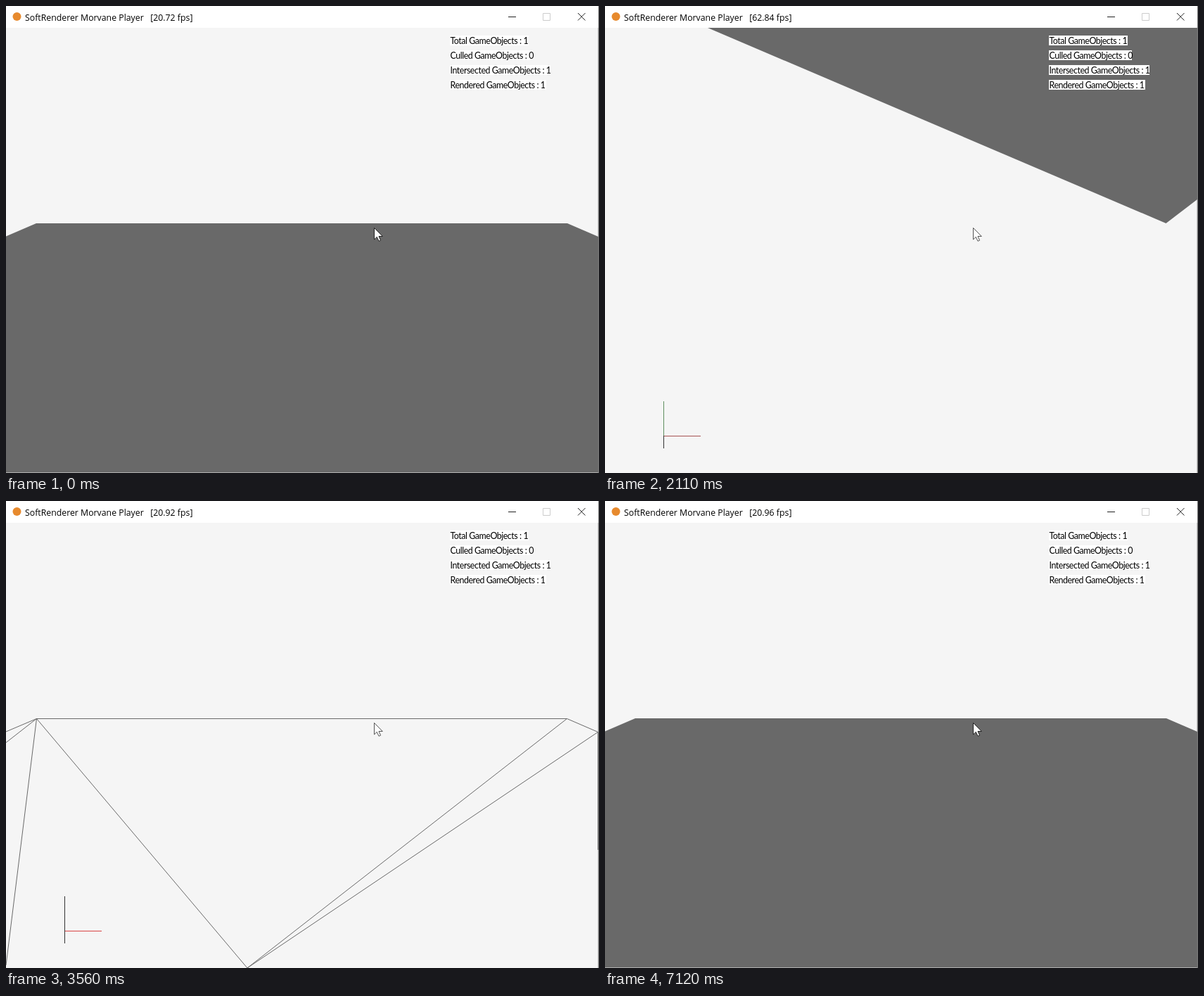
An HTML page that plays this animation: 843 by 664 pixels, repeating every 7.65 s.

```html
<!DOCTYPE html>
<html lang="en">
<head>
<meta charset="utf-8">
<title>SoftRenderer</title>
<style>
  html, body { margin: 0; width: 100%; height: 100%; overflow: hidden; background: #fff; }
  svg { display: block; }
  .title { font: 12.3px "Open Sans", "Noto Sans", sans-serif; white-space: pre; }
  .stats { font: 12.4px Lato, sans-serif; letter-spacing: -.44px; }
  .wire { fill: none; stroke: #696969; }
  .solid { fill: #696969; }
</style>
</head>
<body>
<svg width="843" height="664" viewBox="0 0 843 664">
  <rect width="843" height="664" fill="#fff"/>
  <circle cx="15.5" cy="15" r="6" fill="#e78a2e"/>
  <text class="title" x="27" y="21">SoftRenderer Morvane Player</text>
  <text class="title" id="fps" x="205.2" y="21"></text>
  <g fill="none" stroke="#222">
    <path d="M714 15.5h11"/>
    <path d="M763.5 10.5h10v10h-10z" stroke="#ccc"/>
    <path d="M813 10l10.5 10.5M823.5 10L813 20.5"/>
  </g>
  <rect y="31" width="842" height="633" fill="#f5f5f5"/>

  <path class="solid" id="floor" d="M0 327.5L43 309.1H798L842 328V663.5H0z"/>
  <path class="solid" id="flip" d="M146 31L797.5 309L842 275V31z"/>
  <path class="wire" id="floorWire" d="M0 328L43.5 309.5H797.5L841.5 328.5V496M0 343.5L43.5 309.5L0 660M43.5 309.5L343 664L797.5 309.5M343 664L841.5 328.5"/>
  <path class="wire" id="flipWire" d="M146 31L797.5 309L842 275"/>
  <g id="axes" fill="none">
    <path id="axisY" d="M83.5 562V611"/>
    <path d="M83.5 611V629" stroke="#333"/>
    <path id="axisX" d="M84 611.5H136"/>
  </g>

  <g id="stats"></g>
  <path id="cursor" d="M523.5 315.5V332L527.3 328.4L530 334.3L532.6 333.2L530 327.5H535.3z" fill="#fff"/>
  <path d="M842 0h1v664h-1.3V31h.3z" fill="#777"/>
</svg>
<script>
const LOOP = 7650;
const $ = id => document.getElementById(id);

// [start ms, value]
const scenes = [[0, 'floor'], [1320, 'flip'], [2440, 'floor'], [3560, 'floorWire'],
  [4490, 'flipWire'], [5480, 'floorWire'], [6800, 'floor']];
const rates = [[0, '20.72'], [70, '20.86'], [590, '20.94'], [1120, '20.90'],
  [1580, '62.51'], [2110, '62.84'], [2570, '20.78'], [3100, '20.92'],
  [3630, '1874.35'], [4090, '2011.62'], [4620, '2906.18'], [5080, '3104.53'],
  [5610, '1938.24'], [6070, '2016.49'], [6600, '2030.87'], [7120, '20.96']];

const stats = [['Total', 1, 112], ['Culled', 0, 118], ['Intersected', 1, 143], ['Rendered', 1, 137]];
$('stats').innerHTML = stats.map(([name, count, width], i) => {
  const y = 42 + i * 21;
  return `<rect x="631" y="${y}" width="${width}" height="14" fill="#fff"/>
    <text class="stats" x="631.5" y="${y + 12}">${name} GameObjects : ${count}</text>`;
}).join('');

const valueAt = (steps, t) => steps.findLast(([start]) => start <= t)[1];
const show = (id, on) => $(id).setAttribute('display', on ? 'inline' : 'none');

function draw(now) {
  const t = now % LOOP;
  const scene = valueAt(scenes, t);
  for (const id of ['floor', 'flip', 'floorWire', 'flipWire']) show(id, id === scene);
  show('axes', scene !== 'floor');
  const filled = scene === 'flip';
  $('axisY').setAttribute('stroke', filled ? '#5f8f5f' : '#333');
  $('axisX').setAttribute('stroke', filled ? '#a65353' : '#d84444');
  $('cursor').setAttribute('stroke', scene === 'floor' ? '#222' : '#555');
  $('fps').textContent = `[${valueAt(rates, t)} fps]`;
}

const begin = performance.now();
function tick() {
  draw(performance.now() - begin);
  requestAnimationFrame(tick);
}
tick();
</script>
</body>
</html>
```
